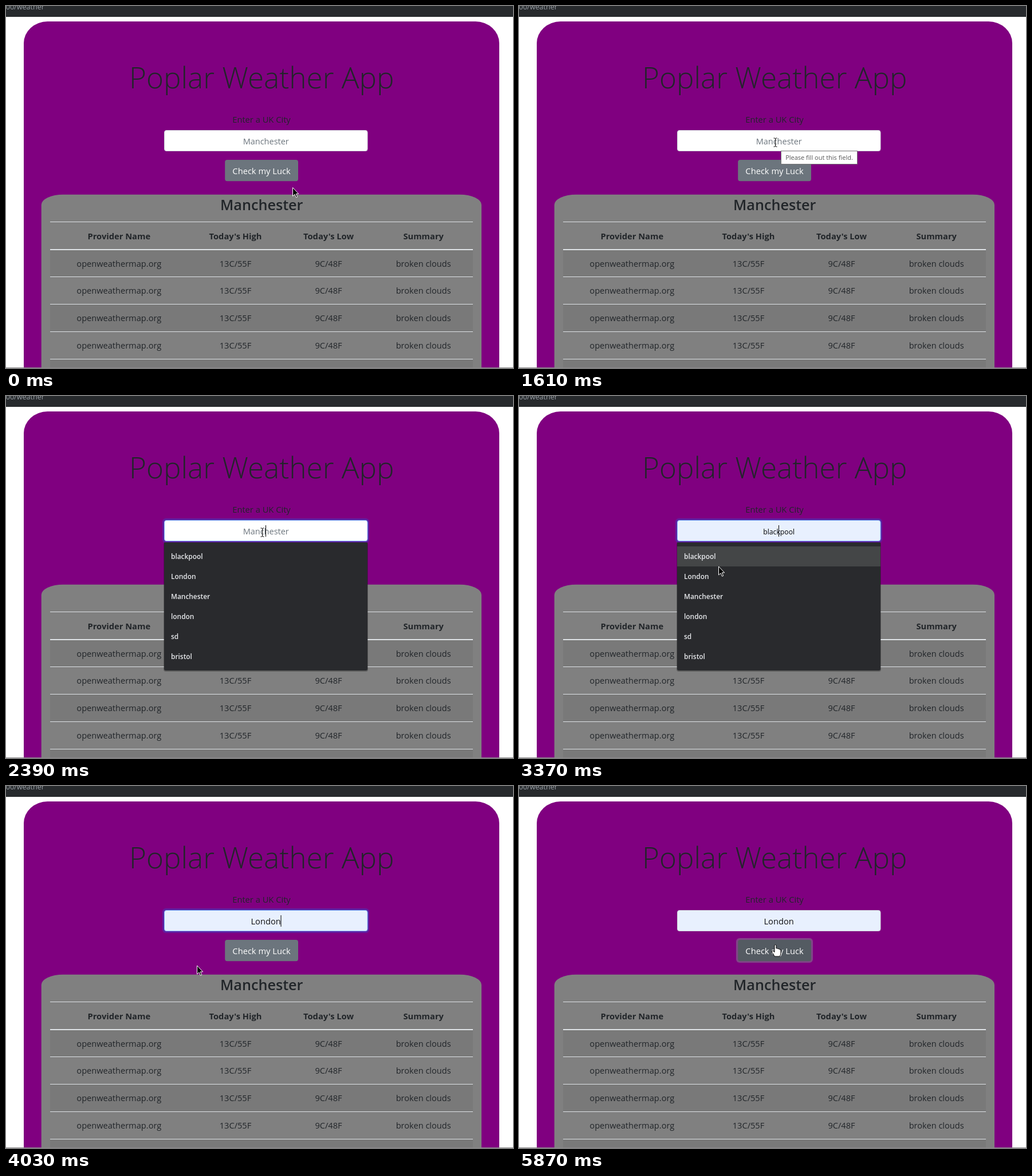
Write an HTML page that moves like this. It is 885x633 px and loops after 8 s.

```html
<!DOCTYPE html>
<html lang="en">
<head>
<meta charset="utf-8">
<title>Weather lookup</title>
<style>
  html, body { margin: 0; width: 100%; height: 100%; overflow: hidden; background: #fff; }
  svg { display: block; font-family: "Open Sans", "Noto Sans", sans-serif; }
</style>
</head>
<body>
<svg id="stage" width="885" height="633" viewBox="0 0 885 633"></svg>
<script>
const LOOP = 8000;
const INK = '#212529';
const CITIES = ['blackpool', 'London', 'Manchester', 'london', 'sd', 'bristol'];
const stage = document.getElementById('stage');

function add(tag, attrs, parent = stage) {
  const node = document.createElementNS('http://www.w3.org/2000/svg', tag);
  for (const key in attrs) node.setAttribute(key, attrs[key]);
  parent.appendChild(node);
  return node;
}
const rect = (x, y, width, height, fill, more, parent) =>
  add('rect', { x, y, width, height, fill, ...more }, parent);

function text(x, y, label, more, parent) {
  const node = add('text', { x, y, fill: INK, 'font-size': 14.7, 'text-anchor': 'middle', ...more }, parent);
  node.textContent = label;
  return node;
}
const show = (node, on) => node.setAttribute('visibility', on ? 'visible' : 'hidden');

// Page and heading
rect(0, 0, 885, 633, '#fff');
rect(0, 0, 885, 19, '#272a2d');
text(67, 6, '00/weather', { 'font-size': 12.6, fill: '#9aa0a6', 'text-anchor': 'end' });
rect(31, 27, 830, 760, '#800080', { rx: 41.5, ry: 38 });
text(446.3, 144.3, 'Poplar Weather App', { 'font-size': 51.2, 'font-weight': 300 });
text(446, 203.5, 'Enter a UK City');

// Form
const inputRing = rect(273, 214, 361, 43, '#601fa0', { rx: 6 });
const input = rect(276.5, 217.5, 354.5, 36, '#fff', { rx: 3.5 });
const value = text(453.7, 242, '');
const buttonRing = rect(379, 266, 134, 43, '#814588', { rx: 6 });
const button = rect(382.2, 269, 127.8, 37.3, '#6c757d', { rx: 4 });
text(446, 293.5, 'Check my Luck', { fill: '#fff' });

// Results table
rect(61.7, 329.7, 768.3, 360, '#808080', { rx: 38, ry: 18 });
text(446.3, 357, 'Manchester', { 'font-size': 25.2, 'font-weight': 600 });
const columns = [197.3, 400.5, 563, 728.7];
const tableRow = (cells, y, more) => cells.forEach((cell, i) => text(columns[i], y, cell, more));
const rule = (y, h) => rect(77, y, 738, h, '#dee2e6');
rule(377, 1);
tableRow(['Provider Name', "Today's High", "Today's Low", 'Summary'], 407.5, { 'font-weight': 700 });
for (let i = 0; i < 5; i++) {
  const top = Math.floor(426 + i * 47.75);
  if (i % 2 === 0) rect(77, top, 738, 48, '#797979');
  if (i) rule(top, 1);
  else rule(top - 1, 2);
  tableRow(['openweathermap.org', '13C/55F', '9C/48F', 'broken clouds'], top + 30, { 'font-size': 14.6 });
}
rect(0, 632, 885, 1, '#8c8a8c');

// Suggestion list
const list = add('g', {});
rect(275, 256, 357, 226, '#000', { rx: 4, opacity: .25 }, list);
add('path', { d: 'M276 256H631V477q0 3-3 3H279q-3 0-3-3z', fill: '#292a2d' }, list);
const highlight = rect(276, 263, 355, 35, '#444647', {}, list);
CITIES.forEach((city, i) => text(288, 284.5 + 35 * i, city,
  { 'font-size': 11.9, 'font-weight': 600, fill: '#e8eaed', 'text-anchor': 'start' }, list));

const tooltip = add('g', {});
rect(457.5, 253.5, 133, 23, '#fff', { stroke: '#767676' }, tooltip);
text(524, 269, 'Please fill out this field.', { 'font-size': 11, fill: '#575757' }, tooltip);

const caret = rect(453, 226, 1, 20, '#000');

// Pointers, each drawn around its own hot spot
const pointers = { arrow: add('g', {}), beam: add('g', {}), hand: add('g', {}) };
add('path', { d: 'M.5 1V16L4 12.8 6.5 18.3 8.7 17.3 6.3 11.9H10.7z',
  fill: '#000', stroke: '#fff', 'stroke-width': 1 }, pointers.arrow);
const beamShape = 'M-3 -7.5H-1L0 -6.5 1 -7.5H3M0 -6.5V6.5M-3 7.5H-1L0 6.5 1 7.5H3';
add('path', { d: beamShape, fill: 'none', stroke: '#fff', 'stroke-width': 2, opacity: .5 }, pointers.beam);
add('path', { d: beamShape, fill: 'none', stroke: '#000' }, pointers.beam);
add('path', { d: 'M-1.5 1.5q1.5-1.8 3 0V7q1.7-.6 2.6.6 1.8-.4 2.7.8 2.7-.2 2.7 2.4V15q0 3-2 6H-1.5Q-3 17-6 13.5q-.6-2.6 1.8-2.3l2.7 2.3z',
  fill: '#fff', stroke: '#000', 'stroke-linejoin': 'round' }, pointers.hand);

// Each entry changes only the properties that it names
const timeline = [
  [0, { pointer: ['arrow', 500, 316.5], city: 'Manchester', mode: 'placeholder', focus: '',
        tip: false, open: false, picked: -1, caret: 0, hover: false }],
  [910, { pointer: ['arrow', 486, 305] }],
  [1060, { pointer: ['beam', 449.5, 243.5] }],
  [1190, { pointer: ['beam', 445.5, 236.5] }],
  [1470, { pointer: ['beam', 447.5, 238.5] }],
  [1610, { tip: true }],
  [2260, { tip: false }],
  [2390, { focus: 'input', open: true, caret: 453 }],
  [2810, { caret: 0 }],
  [3240, { caret: 453, pointer: ['arrow', 396, 270], picked: 0, city: 'blackpool', mode: 'preview' }],
  [3370, { pointer: ['arrow', 348, 297] }],
  [3490, { pointer: ['arrow', 338, 309], picked: 1, city: 'London' }],
  [3610, { pointer: ['arrow', 333, 313] }],
  [3880, { caret: 0 }],
  [4030, { open: false, mode: 'chosen', caret: 479.5 }],
  [4490, { pointer: ['arrow', 505, 394] }],
  [4640, { pointer: ['beam', 692.5, 510.5], caret: 0 }],
  [4800, { pointer: ['beam', 755.5, 560.5] }],
  [4950, { pointer: ['arrow', 797, 600] }],
  [5090, { pointer: ['arrow', 700, 511], caret: 479.5 }],
  [5240, { pointer: ['arrow', 590, 405] }],
  [5360, { pointer: ['arrow', 500, 322] }],
  [5480, { pointer: ['hand', 455, 283], hover: true }],
  [5600, { pointer: ['hand', 447.5, 277], caret: 0 }],
  [5870, { focus: 'button' }]
];
const textStyles = {
  placeholder: { size: 14.5, ink: '#6c757d', fill: '#fff' },
  preview: { size: 12.2, ink: '#000', fill: '#e8f0fe' },
  chosen: { size: 14.7, ink: '#111', fill: '#e8f0fe' }
};

function draw(time) {
  const state = {};
  for (const [start, change] of timeline) if (start <= time) Object.assign(state, change);

  const style = textStyles[state.mode];
  value.textContent = state.city;
  value.setAttribute('font-size', style.size);
  value.setAttribute('fill', style.ink);
  input.setAttribute('fill', style.fill);
  input.setAttribute('stroke', state.focus === 'input' ? '#80bdff' : '#ced4da');
  show(inputRing, state.focus === 'input');
  show(buttonRing, state.focus === 'button');
  button.setAttribute('fill', state.focus === 'button' ? '#545b62' : state.hover ? '#5a6268' : '#6c757d');

  list.setAttribute('display', state.open ? 'inline' : 'none');
  show(highlight, state.open && state.picked >= 0);
  highlight.setAttribute('y', 263 + 35 * Math.max(0, state.picked));
  show(tooltip, state.tip);
  show(caret, state.caret > 0);
  caret.setAttribute('x', state.caret);

  const [kind, x, y] = state.pointer;
  for (const name in pointers) show(pointers[name], name === kind);
  pointers[kind].setAttribute('transform', `translate(${x} ${y})`);
}

const begin = performance.now();
function tick() {
  draw((performance.now() - begin) % LOOP);
  requestAnimationFrame(tick);
}
tick();
</script>
</body>
</html>
```
